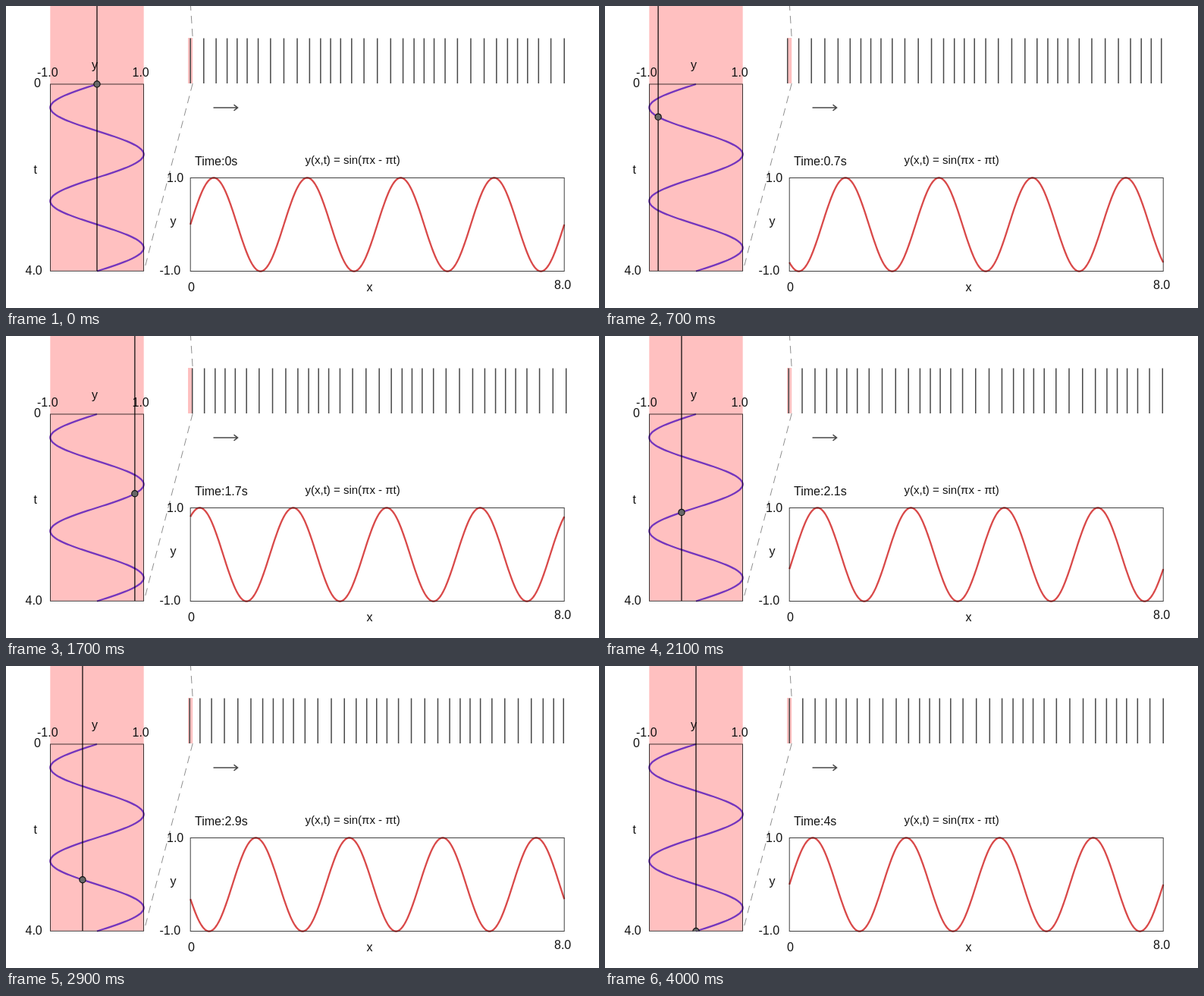
Recreate the animation shown at these times as an HTML page. Size 782x398 px, loop 4.1 s.

```html
<!DOCTYPE html>
<html lang="en">
<head>
<meta charset="utf-8">
<title>Travelling wave</title>
<style>
  html, body { margin: 0; width: 100%; height: 100%; overflow: hidden; background: #fff; }
  svg { display: block; width: 782px; height: 398px; }
  text { font: 16px "Liberation Sans", Arial, sans-serif; fill: #111; }
  .pink { fill: #ffc0c0; }
  .box { fill: none; stroke: #000; stroke-opacity: .75; stroke-width: 1; }
  .curve { fill: none; stroke-width: 2.3; stroke-linejoin: round; }
  .dash { stroke: #808080; stroke-width: .9; stroke-dasharray: 10 7; }
  .dark { fill: none; stroke: #484848; stroke-width: 1.5; }
</style>
</head>
<body>
<svg viewBox="0 0 782 398">
  <defs><clipPath id="above"><rect width="782" height="349.5"/></clipPath></defs>
  <rect class="pink" x="58.3" y="0" width="123.4" height="349"/>
  <rect class="pink" x="240" y="42" width="6.2" height="60"/>
  <path class="dash" d="M243.2 -4L246.2 42"/>
  <path class="dash" d="M246.2 102L182 349"/>
  <path id="trace" class="curve" stroke="#7436bd"/>
  <rect class="box" x="58.5" y="103" width="123" height="246.3"/>
  <path id="wave" class="curve" stroke="#d94a4a"/>
  <rect class="box" x="243.2" y="226.5" width="493" height="123"/>
  <path id="bars" class="dark"/>
  <path class="dark" d="M273.5 134H305.5M300.5 130.2L305.5 134L300.5 137.8"/>
  <g id="labels"></g>
  <text id="clock" x="249" y="210"></text>
  <text x="394.5" y="208" style="font-size:15px">y(x,t) = sin(πx - πt)</text>
  <g clip-path="url(#above)">
    <path id="marker" stroke="#000" stroke-opacity=".8" stroke-width="1.5"/>
    <circle id="dot" r="4.1" fill="#686868" stroke="#111" stroke-width="1.2"/>
  </g>
</svg>
<script>
const UNIT = 61.625, LEFT = 243.2, MID = 288, TOP = 103, CENTRE = 120;
const STEP = 100, LOOP = 4100;
const $ = id => document.getElementById(id);
const y = (x, t) => Math.sin(Math.PI * (x - t));

// Polyline through fn(u) for u from 0 to end.
function plot(end, fn) {
  const n = end * 50;
  return 'M' + Array.from({ length: n + 1 }, (_, i) =>
    fn(i * end / n).map(v => v.toFixed(2)).join(' ')).join('L');
}

const labels = [
  ['-1.0', 41, 93], ['y', 113, 83], ['1.0', 166.5, 93],
  ['0', 37, 107], ['t', 36.5, 221], ['4.0', 25.5, 354],
  ['1.0', 212, 232], ['y', 216.5, 289], ['-1.0', 202.5, 354],
  ['0', 240, 376], ['x', 475.5, 376], ['8.0', 723, 373]
];
for (const [str, px, py] of labels) {
  const el = document.createElementNS('http://www.w3.org/2000/svg', 'text');
  el.setAttribute('x', px);
  el.setAttribute('y', py);
  el.textContent = str;
  $('labels').append(el);
}

$('trace').setAttribute('d', plot(4, t => [CENTRE + UNIT * y(0, t), TOP + UNIT * t]));

function draw(t) {
  $('wave').setAttribute('d', plot(8, x => [LEFT + UNIT * x, MID - UNIT * y(x, t)]));

  let bars = '';
  for (let i = 0; i <= 32; i++) {
    const x = i / 4;
    bars += `M${(LEFT + UNIT * (x + y(x, t) / 20)).toFixed(2)} 42.5V102`;
  }
  $('bars').setAttribute('d', bars);

  const px = CENTRE + UNIT * y(0, t);
  $('marker').setAttribute('d', `M${px.toFixed(2)} 0V349`);
  $('dot').setAttribute('cx', px);
  $('dot').setAttribute('cy', TOP + UNIT * t);
  $('clock').textContent = `Time:${t}s`;
}

let shown = -1;
function tick() {
  const step = Math.floor(performance.now() % LOOP / STEP);
  if (step !== shown) draw((shown = step) / 10);
  requestAnimationFrame(tick);
}
tick();
</script>
</body>
</html>
```
